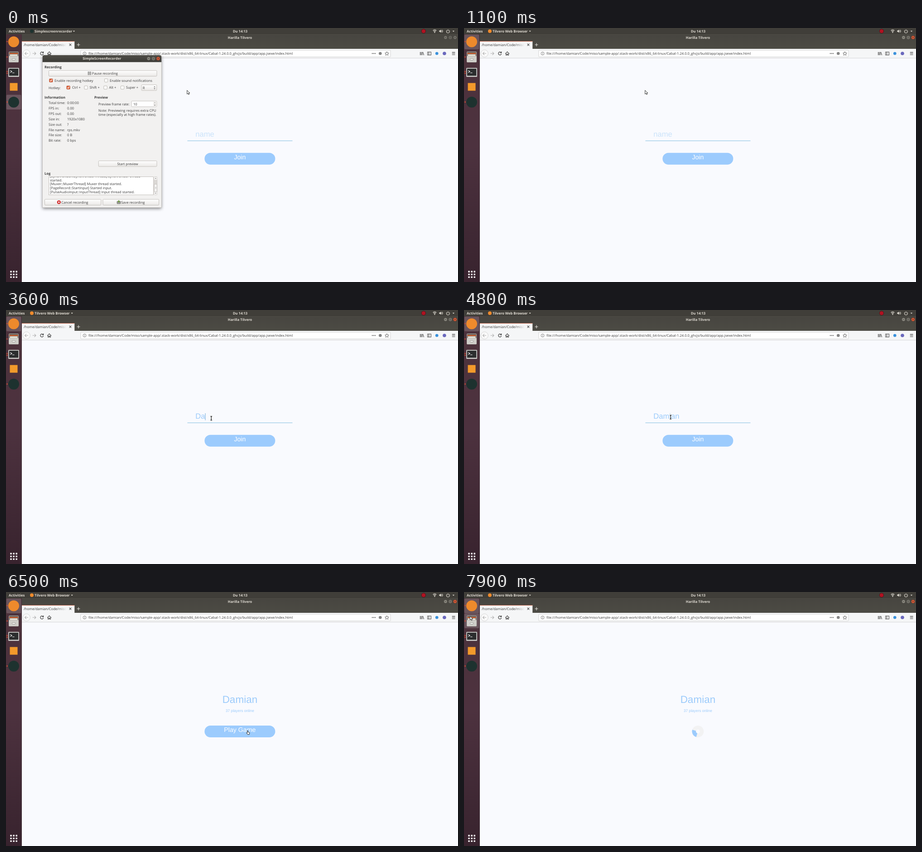
These frames come from a looping animation (998x561 px, 8 s). An HTML page:

```html
<!DOCTYPE html>
<html lang="en">
<head>
<meta charset="utf-8">
<title>Desktop recording</title>
<style>
html, body { margin: 0; width: 100%; height: 100%; overflow: hidden; background: #f9fafe; }
svg { display: block; width: 998px; height: 561px; text-rendering: geometricPrecision; }
text { font: 7.62px "Open Sans", "Noto Sans", sans-serif; fill: #3c3c3c; white-space: pre; }
.b { font-weight: 700; }
.light { font-weight: 700; fill: #dfdbd2; }
.olive { fill: #7f7f0a; }
.web { font-family: "Liberation Sans", Arial, sans-serif; fill: #9ccbfb; }
.white { fill: #fff; }
.mid { text-anchor: middle; }
.line { fill: none; stroke: #4a4a4a; stroke-width: 1.1; }
</style>
</head>
<body>
<svg id="stage" viewBox="0 0 998 561">
  <defs>
    <linearGradient id="dockFill" x2="0" y2="1">
      <stop offset="0" stop-color="#4c323b"/><stop offset=".45" stop-color="#4d323f"/><stop offset="1" stop-color="#38232e"/>
    </linearGradient>
    <linearGradient id="barFill" x2="0" y2="1">
      <stop offset="0" stop-color="#474540"/><stop offset="1" stop-color="#4c4b44"/>
    </linearGradient>
    <linearGradient id="titleFill" x2="0" y2="1">
      <stop offset="0" stop-color="#504e48"/><stop offset="1" stop-color="#3c3b37"/>
    </linearGradient>
    <linearGradient id="btnFill" x2="0" y2="1">
      <stop offset="0" stop-color="#fefefe"/><stop offset="1" stop-color="#ebe9e7"/>
    </linearGradient>
    <linearGradient id="tabFade">
      <stop offset="0" stop-color="#f5f6f7" stop-opacity="0"/><stop offset="1" stop-color="#f5f6f7"/>
    </linearGradient>
    <filter id="blur" x="-10%" y="-10%" width="120%" height="120%"><feGaussianBlur stdDeviation="3.5"/></filter>
    <clipPath id="logClip"><rect x="95" y="329" width="230" height="39.5"/></clipPath>
  </defs>
</svg>
<script>
const LOOP = 8000;
const USER = 'Damian';
const BROWSER = 'Tilvero';
const HOME = '/home/' + USER.toLowerCase() + '/Code/miso/';
const stage = document.getElementById('stage');

// markup helpers; text y is the middle of the capitals, web y the baseline
const tag = (name, attrs, inner = '') =>
  `<${name} ${Object.entries(attrs).map(([k, v]) => `${k}="${v}"`).join(' ')}>${inner}</${name}>`;
const text = (x, y, s, cls = '', id = '') => tag('text', { x, y: y + 2.7, class: cls, id }, s);
const web = (x, y, s, size, cls = '', id = '') =>
  tag('text', { x, y, class: 'web ' + cls, id, style: `font-size:${size}px` }, s);
const rect = (x, y, width, height, fill, more = {}) => tag('rect', { x, y, width, height, fill, ...more });
const circle = (cx, cy, r, fill, more = {}) => tag('circle', { cx, cy, r, fill, ...more });
const path = (d, more = { class: 'line' }) => tag('path', { d, ...more });
const stroke = (d, color, width) => path(d, { fill: 'none', stroke: color, 'stroke-width': width });
const group = (id, inner) => tag('g', { id }, inner);
const down = (x, y, r, fill) => path(`M${x - r} ${y - r / 2}h${2 * r}l${-r} ${r * 1.2}z`, { fill });
const up = (x, y, r, fill) => path(`M${x - r} ${y + r / 2}h${2 * r}l${-r} ${-r * 1.2}z`, { fill });
const cross = (x, y, r, color, w = 1) =>
  stroke(`M${x - r} ${y - r}l${2 * r} ${2 * r}m0 ${-2 * r}l${-2 * r} ${2 * r}`, color, w);

function windowButtons([a, b, c], y, closeFill, fill) {
  const ring = { stroke: '#33322e', 'stroke-width': .6 };
  return circle(a, y, 4, fill, ring) + circle(b, y, 4, fill, ring) + circle(c, y, 4, closeFill, ring) +
    stroke(`M${a - 1.8} ${y}h3.6M${b - 1.5} ${y - 1.5}h3v3h-3z`, '#35342f', .8) + cross(c, y, 1.5, '#35342f', .9);
}

function dock() {
  const tile = (id, y) => rect(1, y, 32.5, 32.5, '#fff', { id, rx: 2, 'fill-opacity': .17, visibility: 'hidden' });
  const dots = [30, 64, 96, 100, 163.5].map(y => circle(2.6, y, 1.2, '#e0512f')).join('');
  let grid = '';
  for (let i = 0; i < 9; i++) grid += rect(9.2 + i % 3 * 6.1, 542.4 + (Math.floor(i / 3) - 1) * 6.1, 3.6, 3.6, '#f4f1f2', { rx: 1 });
  const files = rect(6, 52, 22, 24, '#a5a49e', { rx: 2 }) + rect(7.3, 53.6, 19.4, 8, '#3e3d3a') +
    rect(7.3, 55, 19.4, 2.4, '#dc6a38') + rect(8.3, 58.2, 17.4, 3.4, '#f1ece0') +
    rect(6.3, 62, 21.4, 13.6, '#cfcec9', { rx: 1 }) +
    rect(13.5, 67.4, 7, 3.4, '#f6f6f4', { rx: 1, stroke: '#77766f', 'stroke-width': .7 });
  const terminal = rect(5, 88, 24, 20, '#c9c9c6', { rx: 1.5 }) + rect(6.8, 89.8, 20.4, 15.6, '#2b2d2e') +
    stroke('M9.5 93.8l3.5 2.4l-3.5 2.4M14 99h4.5', '#fff', 1.2);
  return rect(0, 14, 34.8, 547, 'url(#dockFill)') + rect(34.2, 14, .7, 547, '#33222a') +
    tile('tileWeb', 14.5) + tile('tileFiles', 47.5) + tile('tileRec', 147.5) + dots +
    circle(17, 30.5, 12, '#ee8a2c') + files + terminal +
    rect(8.5, 121.5, 17, 17, '#f39a2b') + circle(17, 163.7, 12, '#1d322f') + grid;
}

function panel() {
  const pale = '#dfdbd2';
  return rect(0, 0, 998, 14, '#403e39') + text(6, 7, 'Activities', 'light') +
    circle(57, 7, 4, '#ee8a2c', { id: 'menuIcon' }) + text(63, 7, '', 'light', 'menuText') +
    group('menuArrow', down(0, 7, 2.2, pale)) +
    text(517, 7, 'Du 14:13', 'light mid') + circle(922, 7, 4.6, '#b01222', { stroke: '#4f151a', 'stroke-width': 1 }) +
    stroke('M942.6 5.6q3.9-3.4 7.8 0M943.9 7.4q2.6-2.2 5.2 0M945.2 9.1q1.3-1 2.6 0', pale, 1.2) +
    circle(946.5, 10.2, .9, pale) + path('M956.5 5.6h1.8l2.4-2.2v7.2l-2.4-2.2h-1.8z', { fill: pale }) +
    stroke('M961.8 5q1.6 2 0 4M963.2 3.8q2.8 3.2 0 6.4', pale, .9) +
    stroke('M973.9 4.6a3.5 3.5 0 1 0 4 0M975.9 3v4', pale, 1.1) + down(988, 7, 2.2, pale);
}

function browser() {
  const dots = [808.8, 812, 815.2].map(x => circle(x, 56.3, 1.1, '#555')).join('');
  const buttons = [970.5, 981, 991.5];
  return rect(34.8, 14, 963.2, 32, 'url(#barFill)') + rect(34.8, 14, 963.2, .7, '#55534d') +
    text(516.5, 21, 'Harilla ' + BROWSER, 'light mid') +
    group('winIdle', windowButtons(buttons, 21, '#77756e', '#77756e')) +
    group('winLive', windowButtons(buttons, 21, '#e25a35', '#8a887f')) +
    rect(35, 29, 116.3, 17.5, '#f5f6f7') + rect(35, 29, 116.3, .9, '#d4684a') +
    text(39, 37, HOME) + rect(114, 31, 20, 14, 'url(#tabFade)') + rect(134, 31, 4, 14, '#f5f6f7') +
    cross(142, 37, 2.3, '#444', 1.1) + stroke('M156.5 37h7M160 33.5v7', '#e8e6e1', 1.1) +
    rect(35, 46, 963, 20.5, '#f5f6f7') + rect(35, 66.2, 963, .8, '#cfcfcf') +
    circle(45.3, 56.2, 8, '#fafafa', { stroke: '#c4c4c4', 'stroke-width': .7 }) +
    stroke('M49 56.2h-7.4m3.3-3.3l-3.3 3.3l3.3 3.3M58.6 56.2h7.4m-3.3-3.3l3.3 3.3l-3.3 3.3', '#b0b0b0', 1.1) +
    stroke('M82 54.2a3.4 3.4 0 1 0 .6 2.9M82.6 52v2.9h-2.9', '#3c3c3c', 1.2) +
    stroke('M91.3 56.6l4.3-4.2l4.3 4.2M92.7 56v4h2v-2.4h1.8v2.4h2v-4', '#3c3c3c', 1.1) +
    rect(165, 49, 684, 14.8, '#fff', { rx: 1, stroke: '#c9c9c9', 'stroke-width': .8 }) +
    circle(173.5, 56.3, 3.5, 'none', { stroke: '#666', 'stroke-width': .8 }) + stroke('M173.5 55.7v2.5M173.5 53.9v.9', '#666', .9) +
    text(182, 56.5, `file://${HOME}sample-app/.stack-work/dist/x86_64-linux/Cabal-1.24.0.0_ghcjs/build/app/app.jsexe/index.html`) +
    dots + circle(826.3, 56.3, 3.3, '#858585') +
    stroke('M841 52.2l1.3 2.8 3 .3-2.3 2 .7 3-2.7-1.6-2.7 1.6.7-3-2.3-2 3-.3z', '#555', .9) +
    path('M914.6 53v7M916.8 53v7M919 53v7M920.4 53.2l2.2 6.8') +
    path('M930.8 53h7.6v6.8h-7.6zM933.6 53v6.8') +
    circle(951.3, 56.3, 3.3, '#3a91dc') + circle(968, 56.3, 3.8, '#6a68bd') +
    path('M984.8 53.6h6.8M984.8 56.3h6.8M984.8 59h6.8');
}

function page() {
  const mid = 516.4;
  const pill = (y, label) => rect(mid - 78, y, 156, 26, '#9ccbfd', { rx: 13 }) + web(mid, y + 14.2, label, 14.2, 'white mid');
  return rect(34.8, 67, 963.2, 494, '#f9fafe') +
    group('join', web(418.3, 240.2, '', 16.63, '', 'field') + rect(418.4, 228, .9, 15.5, '#5f9fd0', { id: 'caret' }) +
      rect(400.5, 248.5, 232, 1.3, '#9ccbe8') + pill(275.8, 'Join')) +
    group('lobby', web(mid, 245.3, USER, 22.5, 'mid') + web(mid, 264.9, '37 players online', 8.32, 'mid')) +
    group('play', pill(295, 'Play Game')) +
    group('spinner', circle(0, 0, 8.6, 'none', { stroke: '#f2f2f3', 'stroke-width': 8.6 }) +
      stroke('M-6.08 -6.08A8.6 8.6 0 0 1 6.08 -6.08', '#9ccbfd', 8.6));
}

function recorder() {
  const edge = { rx: 1.5, stroke: '#b9b5b0', 'stroke-width': .8 };
  const button = (x, y, w, h = 12.6) => rect(x, y, w, h, 'url(#btnFill)', edge);
  const check = (x, y, on) => rect(x, y, 7.2, 7.2, on ? '#e2643c' : '#fff', { rx: 1, stroke: on ? '#a8492b' : '#aaa69f', 'stroke-width': .8 }) +
    (on ? stroke(`M${x + 1.6} ${y + 3.6}l1.6 1.8l2.8-3.9`, '#fff', 1.2) : '');
  const pauseBar = x => rect(x, 96.8, 2.6, 6.6, '#b8b8b6', { stroke: '#777', 'stroke-width': .6 });
  const rows = [['Total time:', '0:00:00'], ['FPS in:', '0.00', 'fpsIn'], ['FPS out:', '0.00'], ['Size in:', '1920x1080'],
    ['Size out:', '?', 'sizeOut'], ['File name:', 'rps.mkv'], ['File size:', '0 B', 'fileSize'], ['Bit rate:', '0 bps']];
  const info = rows.map(([k, v, id], i) => text(94, 165.2 + i * 11.93, k) + text(135, 165.2 + i * 11.93, v, '', id)).join('');
  const log = (id, lines, cls) => group(id, lines.map((s, i) => text(97, 327 + i * 8.8, s, cls)).join(''));
  const warn = ['[Synchronizer::ReadAudioSamples] Warning: Received audio', 'samples with non-monotonic timestamp.'];
  const keys = [[134, 'Ctrl +', 146, 1], [173, 'Shift +', 184.5], [216, 'Alt +', 227.5], [253.5, 'Super +', 265]];
  return rect(81, 63, 262, 336, '#000', { filter: 'url(#blur)', opacity: .5 }) +
    rect(80.6, 60, 262.6, 336.6, '#f2f1f0', { rx: 3 }) + rect(80.6, 75, 262.6, 321.6, '#f2f1f0', { stroke: '#b5b2ae', 'stroke-width': .6 }) +
    path('M80.6 75.2V64q0-4 4-4h254.6q4 0 4 4v11.2z', { fill: 'url(#titleFill)' }) +
    text(211.8, 67.7, 'SimpleScreenRecorder', 'light mid') + windowButtons([315, 325.5, 336], 67.6, '#e25a35', '#8a887f') +
    text(85, 86, 'Recording', 'b') + button(94.5, 93.9, 238.5) + pauseBar(181) + pauseBar(185) + text(189.8, 100.2, 'Pause recording') +
    check(95.8, 112.2, 1) + text(107, 116, 'Enable recording hotkey') + check(217.5, 112.2) + text(229, 116, 'Enable sound notifications') +
    text(94, 131.8, 'Hotkey:') + keys.map(([x, s, tx, on]) => check(x, 127.9, on) + text(tx, 131.6, s)).join('') +
    button(299, 125.4, 33.8) + text(301.8, 132, 'R') + up(328, 130, 1.7, '#555') + down(328, 134, 1.7, '#555') +
    text(85, 153.6, 'Information', 'b') + text(195, 153.6, 'Preview', 'b') + info +
    text(204, 168, 'Preview frame rate:') + rect(277, 161.3, 55.8, 12.6, '#fff', edge) + rect(324.8, 161.7, 7.6, 11.8, '#f1efed') +
    text(281, 168, '10') + up(328.6, 165, 1.4, '#888') + down(328.6, 170.5, 1.6, '#555') +
    text(204, 182.6, 'Note: Previewing requires extra CPU') + text(204, 191.3, 'time (especially at high frame rates).') +
    button(204.3, 293.4, 128.7) + text(268.6, 299.8, 'Start preview', 'mid') + text(85, 321.2, 'Log', 'b') +
    rect(94.4, 328.6, 231, 40, '#fff', { stroke: '#b9b5b0', 'stroke-width': .8 }) +
    tag('g', { 'clip-path': 'url(#logClip)' },
      log('logStart', ['[Synchronizer::SynchronizerThread] Synchronizer thread', 'started.', '[Muxer::MuxerThread] Muxer thread started.',
        '[PageRecord::StartInput] Started input.', '[PulseAudioInput::InputThread] Input thread started.'], '') +
      log('logWarn', [warn[1], ...warn, ...warn], 'olive')) +
    rect(327.2, 328.6, 6.4, 40, '#dcd9d6', { rx: 1, stroke: '#b9b5b0', 'stroke-width': .6 }) +
    rect(327.4, 329, 6, 6.3, '#f4f3f2') + rect(327.4, 362, 6, 6.3, '#f4f3f2') + up(330.4, 332, 1.4, '#666') + down(330.4, 365, 1.4, '#666') +
    rect(327.4, 345, 6, 16.5, '#f5f4f3', { rx: 1, stroke: '#aaa6a1', 'stroke-width': .6 }) + stroke('M329 352h3M329 354h3', '#999', .6) +
    button(85.5, 378.3, 124.3, 13) + circle(116.8, 384.8, 4, '#cf2222') + cross(116.8, 384.8, 1.6, '#fff', 1.3) + text(122.2, 384.8, 'Cancel recording') +
    button(214, 378.3, 123.6, 13) + rect(245, 382.6, 8, 5.6, '#9a9b96', { rx: 1, stroke: '#5d5e59', 'stroke-width': .6 }) +
    path('M248 380.6h2v2.4h1.6l-2.6 2.6l-2.6-2.6h1.6z', { fill: '#6fa038' }) + text(254.2, 384.8, 'Save recording');
}

function pointer() {
  const ink = { fill: '#fff', stroke: '#1c1c1c', 'stroke-width': .9, 'stroke-linejoin': 'round' };
  const beam = 'M-1.9 -4.4q1.9 0 1.9 1.2V3.2q0 1.2 -1.9 1.2M1.9 -4.4q-1.9 0 -1.9 1.2V3.2q0 1.2 1.9 1.2';
  return group('pointer',
    group('arrow', path('M.2 .2V8.6L2.2 6.8L3.5 9.7L5 9L3.8 6.2H6.2z', ink)) +
    group('beam', stroke(beam, '#fff', 2.6) + stroke(beam, '#222', 1.3)) +
    group('hand', path('M-.7 .9q.7-1 1.4 0V3.9l3 .7q.9.3.8 1.2L3.8 9.3H0L-2 6.3q-.2-1 .5-.8l.8.6z', ink)));
}

stage.insertAdjacentHTML('beforeend', page() + browser() + dock() + panel() + group('recorder', recorder()) + pointer());

const $ = id => document.getElementById(id);
const show = (id, on) => $(id).setAttribute('visibility', on ? 'inherit' : 'hidden');
const write = (id, s) => { if ($(id).textContent !== s) $(id).textContent = s; };

const WARN = 150, STATS = 500, HIDE = 1050, FOCUS = 2350, ENTER = 4960, SEARCH = 6560;
const KEYS = [3350, 3520, 3680, 3840, 3990, 4150];
const BLINK = 600;
const MOVES = [ // start, end, x, y
  [1500, 2300, 450.2, 241.5], [3500, 3700, 456.2, 236.5], [5650, 6250, 533.4, 305.3], [6850, 7450, 13, 53.2]];

function pointerAt(t) {
  let x = 399.6, y = 137.4;
  for (const [from, to, tx, ty] of MOVES) {
    const p = Math.min(1, Math.max(0, (t - from) / (to - from)));
    const e = p * p * (3 - 2 * p);
    x += (tx - x) * e;
    y += (ty - y) * e;
  }
  return [x, y];
}

function draw(t) {
  const recording = t < HIDE, joining = t < ENTER, waiting = t >= SEARCH;
  const stats = t >= STATS, warned = t >= WARN;

  show('recorder', recording);
  show('winIdle', recording);
  show('winLive', !recording);
  write('menuText', recording ? 'Simplescreenrecorder' : BROWSER + ' Web Browser');
  $('menuIcon').setAttribute('fill', recording ? '#1d322f' : '#ee8a2c');
  $('menuArrow').setAttribute('transform', `translate(${recording ? 150 : 145.7})`);
  write('fpsIn', stats ? '30.88' : '0.00');
  write('sizeOut', stats ? '1920x1080' : '?');
  write('fileSize', stats ? '69 kB' : '0 B');
  show('logStart', !warned);
  show('logWarn', warned);

  const typed = KEYS.filter(k => t >= k);
  const lastInput = typed.length ? typed[typed.length - 1] : FOCUS;
  write('field', typed.length ? USER.slice(0, typed.length) : 'name');
  $('field').style.fill = typed.length ? '#9ccbfb' : '#cbe3fa';
  show('join', joining);
  show('caret', joining && t >= FOCUS && Math.floor((t - lastInput) / BLINK) % 2 === 0);
  $('caret').setAttribute('x', 418.4 + (joining && typed.length ? $('field').getComputedTextLength() : 0));

  show('lobby', !joining);
  show('play', !joining && !waiting);
  show('spinner', waiting);
  $('spinner').setAttribute('transform', `translate(516.4 308) rotate(${(t - SEARCH) * .18})`);

  const [x, y] = pointerAt(t);
  const onField = joining && x > 400 && x < 632 && y > 222 && y < 249;
  const onPlay = !joining && !waiting && x > 439 && x < 595 && y > 295 && y < 321;
  $('pointer').setAttribute('transform', `translate(${x} ${y})`);
  show('beam', onField);
  show('hand', onPlay);
  show('arrow', !onField && !onPlay);
  show('tileWeb', !recording);
  show('tileRec', recording);
  show('tileFiles', x < 34 && y > 47 && y < 80);
}

function tick() {
  draw(performance.now() % LOOP);
  requestAnimationFrame(tick);
}
tick();
</script>
</body>
</html>
```
